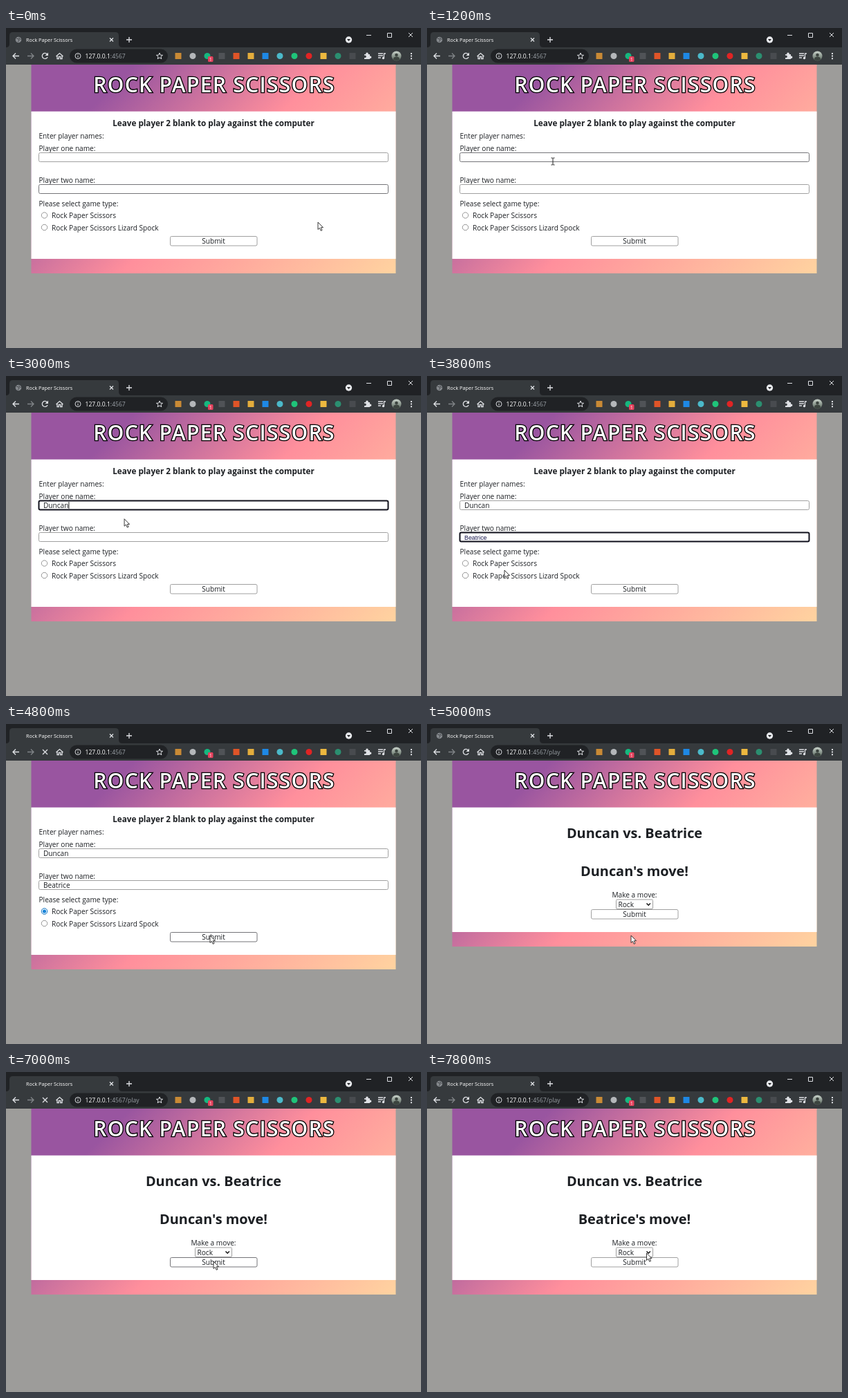
Animation, 600 px wide and 463 px high, one loop 8 s. Source, as an HTML page:

```html
<!DOCTYPE html>
<html lang="en">
<head>
<meta charset="utf-8">
<title>Rock Paper Scissors</title>
<style>
  html, body { margin: 0; width: 100%; height: 100%; overflow: hidden; background: #9d9c9a; }
  svg { display: block; width: 100%; height: 100%; }
  text { font: 10.12px "Open Sans", "Noto Sans", sans-serif; fill: #1c1f23; white-space: pre; }
  .mid { text-anchor: middle; }
  .title { font-size: 30px; font-weight: 600; letter-spacing: 1.3px; fill: #fff; stroke: #000; stroke-width: 2.6px; paint-order: stroke; }
  .lead { font-size: 11.7px; font-weight: 700; }
  .big { font-size: 19.9px; font-weight: 700; }
  .preview { font: 8.9px "Liberation Sans", Arial, sans-serif; fill: #1a1a50; }
  .tab { font-size: 7.3px; fill: #fff; }
  .url { font-size: 8.6px; fill: #fff; }
  .dim { fill: #9aa0a6; }
  .box { fill: #fff; stroke: #a0a0a0; }
  .box.hover { stroke: #747478; }
  .box.focus { stroke: #10101c; stroke-width: 2px; }
  .line { fill: none; stroke: #dfe1e5; stroke-width: 1.3px; }
  .radio { fill: #fff; stroke: #8c8c8c; stroke-width: .9px; }
  .off { display: none; }
</style>
</head>
<body>
<svg viewBox="0 0 600 463">
  <defs>
    <linearGradient id="sunset" gradientUnits="userSpaceOnUse">
      <stop offset=".18" stop-color="#9955a0"/>
      <stop offset=".52" stop-color="#ff8f9c"/>
      <stop offset="1" stop-color="#ffd3a0"/>
    </linearGradient>
    <linearGradient id="portrait" x2="0" y2="1">
      <stop stop-color="#c9d3cb"/><stop offset="1" stop-color="#56645a"/>
    </linearGradient>
  </defs>

  <rect width="600" height="463" fill="#9d9c9a"/>

  <!-- Browser window -->
  <rect width="600" height="53" fill="#202225"/>
  <path d="M0 28H600V53H0zM0 28Q5 28 5 23V11Q5 6 10 6H158Q163 6 163 11V23Q163 28 168 28z" fill="#363a3d"/>
  <g id="favicon">
    <circle cx="18" cy="17" r="4.3" fill="#85898d"/>
    <path d="M15 15l3 1 1 2-2 2M19 13.500l0 2 2.500 1" fill="none" stroke="#45484c"/>
  </g>
  <text class="tab" x="29" y="19.700">Rock Paper Scissors</text>
  <path class="line" d="M150 14.500l5 5m0-5l-5 5M174 17h8m-4-4v8"/>
  <circle cx="495.500" cy="17" r="4.700" fill="#e8eaed"/>
  <path d="M493 16h5l-2.500 3z" fill="#202124"/>
  <path class="line" d="M521 10.500h7M551.500 7.500h6v6h-6zM582 7l6 6m0-6l-6 6" style="stroke-width:1px"/>

  <path class="line" d="M19 40.500H10m4-4l-4 4 4 4"/>
  <path class="line" d="M31 40.500h9m-4-4l4 4-4 4" style="stroke:#808488"/>
  <g id="reload">
    <path class="line" d="M59.500 38A4 4 0 1 0 60 42"/>
    <path d="M61 35.500v4.500h-4.500z" fill="#dfe1e5"/>
  </g>
  <path id="stop" class="line" d="M53 37l7 7m0-7l-7 7"/>
  <path class="line" d="M72.500 41l5-4.500 5 4.500M74 40v4.500h2.300v-3h2.400v3h2.300V40"/>
  <rect x="92" y="30.500" width="142" height="20" rx="10" fill="#202225"/>
  <circle class="line" cx="104" cy="40.500" r="4" style="stroke-width:1px"/>
  <path class="line" d="M104 40v2.700M104 38v1" style="stroke-width:1px"/>
  <text class="url" x="114.500" y="43.800">127.0.0.1<tspan class="dim">:4567<tspan id="path"></tspan></tspan></text>
  <path id="star" class="line" style="stroke-width:1px"/>
  <g id="extensions"></g>
  <rect x="292" y="41" width="7.500" height="8" rx="1.500" fill="#e5405c"/>
  <text x="295.700" y="47.700" class="mid" style="font-size:7px;fill:#fff">1</text>
  <path d="M518 38h2.300a1.800 1.800 0 1 1 3.400 0H526v2.500a1.800 1.800 0 1 1 0 3.400V45h-8v-2.200a1.800 1.800 0 1 0 0-3z" fill="#dfe1e5"/>
  <path class="line" d="M538 37h7M538 40h7M538 43h4M546.500 43.500V37h2.500"/>
  <circle cx="545.500" cy="43.500" r="1.700" fill="#dfe1e5"/>
  <circle cx="564.500" cy="40.500" r="7" fill="url(#portrait)"/>
  <path d="M560 45.500q0-4 4.500-4t4.500 4q-4.500 3-9 0" fill="#3c443f"/>
  <circle cx="564.500" cy="39" r="2.300" fill="#3c443f"/>
  <path d="M585 36h2v2h-2zm0 3.600h2v2h-2zm0 3.600h2v2h-2z" fill="#dfe1e5"/>

  <!-- Page -->
  <rect id="card" x="36.500" y="53" width="527" fill="url(#sunset)"/>
  <rect id="panel" x="36.500" y="120.700" width="527" fill="#fff"/>
  <text class="title mid" x="301" y="92.700">ROCK PAPER SCISSORS</text>

  <g id="form">
    <text class="lead mid" x="300" y="142.300">Leave player 2 blank to play against the computer</text>
    <text x="47.500" y="160.300">Enter player names:</text>
    <text x="47.500" y="177.700">Player one name:</text>
    <rect id="fieldOne" class="box" x="47.500" y="180.500" width="505" height="13" rx="2"/>
    <text id="nameOne" x="54" y="190.700"></text>
    <text x="47.500" y="223.700">Player two name:</text>
    <rect id="fieldTwo" class="box" x="47.500" y="226.500" width="505" height="13" rx="2"/>
    <text id="nameTwo" x="54" y="236.700"></text>
    <path id="caret" stroke="#222"/>
    <text x="47.500" y="258">Please select game type:</text>
    <circle class="radio" cx="55.500" cy="271" r="4.200"/>
    <g id="picked">
      <circle cx="55.500" cy="271" r="4.200" fill="#fff" stroke="#1683d8"/>
      <circle cx="55.500" cy="271" r="2.600" fill="#1683d8"/>
    </g>
    <text x="66" y="275">Rock Paper Scissors</text>
    <circle class="radio" cx="55.500" cy="288.500" r="4.200"/>
    <text x="66" y="293">Rock Paper Scissors Lizard Spock</text>
    <rect id="start" class="box" x="237.500" y="301.500" width="125.500" height="13.500" rx="2"/>
    <text class="mid" x="300" y="312">Submit</text>
  </g>

  <g id="play">
    <text id="match" class="big mid" x="300" y="165"></text>
    <text id="turn" class="big mid" x="300" y="220"></text>
    <text class="mid" x="300" y="251.300">Make a move:</text>
    <rect id="select" class="box" x="273.500" y="254" width="53" height="13.500" rx="1.500"/>
    <text x="276.500" y="264.600">Rock</text>
    <path d="M317.500 259.500l2.700 2.700 2.700-2.700" fill="none" stroke="#111" stroke-width="1.500"/>
    <rect id="send" class="box" x="237.500" y="268.500" width="125.500" height="13.500" rx="2"/>
    <text class="mid" x="300" y="279">Submit</text>
  </g>

  <path id="arrow" d="M0 0V10.500L2.400 8.300 4.200 12.300 6 11.500 4.300 7.700H7.500z" fill="#fff" stroke="#222" stroke-width=".9"/>
  <path id="beam" d="M-2.500-5H-.5L0-4.500.5-5H2.500M0-4.500V4.500M-2.500 5H-.5L0 4.500.5 5H2.500" fill="none" stroke="#222"/>
</svg>

<script>
  const LOOP = 8000, STEP = 200;
  const PLAYER_ONE = 'Duncan', PLAYER_TWO = 'Beatrice';
  const $ = id => document.getElementById(id);
  const show = (id, on) => $(id).classList.toggle('off', !on);
  const set = (id, attributes) => {
    for (const [key, value] of Object.entries(attributes)) $(id).setAttribute(key, value);
  };

  // Time, x, y of the pointer
  const POINTER = [
    [0, 451, 281], [200, 451, 281], [1000, 182, 193], [2800, 182, 193],
    [3600, 112, 281], [3800, 112, 281], [4200, 55, 271], [4400, 55, 271],
    [4600, 295, 306], [5000, 295, 306], [5600, 319, 255], [6200, 319, 255],
    [6800, 300, 274], [7200, 300, 274], [7600, 317.5, 262], [8000, 317.5, 262]
  ];

  const EXTENSIONS = [
    ['square', '#c98a35'], ['circle', '#b4b7ba'], ['circle', '#15b87f'], ['square', '#505357'],
    ['square', '#df5428'], ['square', '#e3ad3c'], ['square', '#1e88e5'], ['circle', '#4bb9c9'],
    ['circle', '#1fc47a'], ['circle', '#e02424'], ['square', '#edb83f'], ['circle', '#2b8f70'],
    ['square', '#484b4f']
  ];

  function drawStaticIcons() {
    $('extensions').innerHTML = EXTENSIONS.map(([kind, color], i) => {
      const x = 249 + 21 * i - 4.5, radius = kind === 'circle' ? 4.5 : 0.5;
      return `<rect x="${x}" y="36" width="9" height="9" rx="${radius}" fill="${color}"/>`;
    }).join('');
    const points = Array.from({ length: 10 }, (_, i) => {
      const angle = (i / 5 - 0.5) * Math.PI, r = i % 2 ? 2.1 : 4.8;
      return [222 + r * Math.cos(angle), 40.8 + r * Math.sin(angle)];
    });
    set('star', { d: `M${points.join('L')}z` });
  }

  function pointerAt(t) {
    const i = POINTER.findIndex(key => key[0] > t);
    const [t0, x0, y0] = POINTER[i - 1], [t1, x1, y1] = POINTER[i];
    const u = (t - t0) / (t1 - t0), eased = u * u * (3 - 2 * u);
    return [x0 + (x1 - x0) * eased, y0 + (y1 - y0) * eased];
  }

  function style(id, hover, focus = false) {
    $(id).classList.toggle('hover', hover);
    $(id).classList.toggle('focus', focus);
  }

  function drawCard(bottom) {
    const height = bottom - 53, middle = 53 + height / 2, reach = (526 + height) / 4;
    set('card', { height });
    set('panel', { height: bottom - 21 - 120.7 });
    set('sunset', { x1: 300 - reach, y1: middle - reach, x2: 300 + reach, y2: middle + reach });
  }

  function drawForm(t, overOne) {
    const focusOne = t >= 1400 && t < 3200, focusTwo = t >= 3200 && t < 4200;
    style('fieldOne', overOne, focusOne);
    style('fieldTwo', t < 1000, focusTwo);
    style('start', t >= 4600);

    const typed = Math.max(0, Math.floor((t - 2400) / 100));
    $('nameOne').textContent = PLAYER_ONE.slice(0, typed);
    $('nameTwo').textContent = PLAYER_TWO.slice(0, t < 3400 ? 0 : t < 3600 ? 1 : 8);
    $('nameTwo').classList.toggle('preview', t >= 3600 && t < 4000);

    const blink = Math.floor((t - 1400) / 500) % 2 === 0;
    show('caret', focusOne && (typed > 0 || blink));
    const caretX = 54.5 + (typed ? $('nameOne').getComputedTextLength() : 0);
    set('caret', { d: `M${caretX} 182v10` });
    show('picked', t >= 4200);
  }

  function drawPlay(t) {
    $('match').textContent = `${PLAYER_ONE} vs. ${PLAYER_TWO}`;
    $('turn').textContent = `${t < 7200 ? PLAYER_ONE : PLAYER_TWO}'s move!`;
    style('select', t >= 5400 && t < 6600);
    style('send', t >= 6600 && t < 7400);
  }

  function draw(t) {
    const playing = t >= 5000, loading = t === 4800 || t === 7000;
    const [x, y] = pointerAt(t);
    const over = top => !playing && x > 47 && x < 553 && y >= top && y <= top + 15;
    const overOne = over(179), overField = overOne || over(225);

    show('form', !playing);
    show('play', playing);
    show('favicon', !loading);
    show('reload', !loading);
    show('stop', loading);
    $('path').textContent = playing ? '/play' : '';
    drawCard(playing ? 322 : 355);
    if (playing) drawPlay(t); else drawForm(t, overOne);

    show('arrow', !overField);
    show('beam', overField);
    set(overField ? 'beam' : 'arrow', { transform: `translate(${x} ${y})` });
  }

  function tick() {
    const t = performance.now() % LOOP;
    draw(Math.floor(t / STEP) * STEP);
    requestAnimationFrame(tick);
  }

  drawStaticIcons();
  tick();
</script>
</body>
</html>
```
